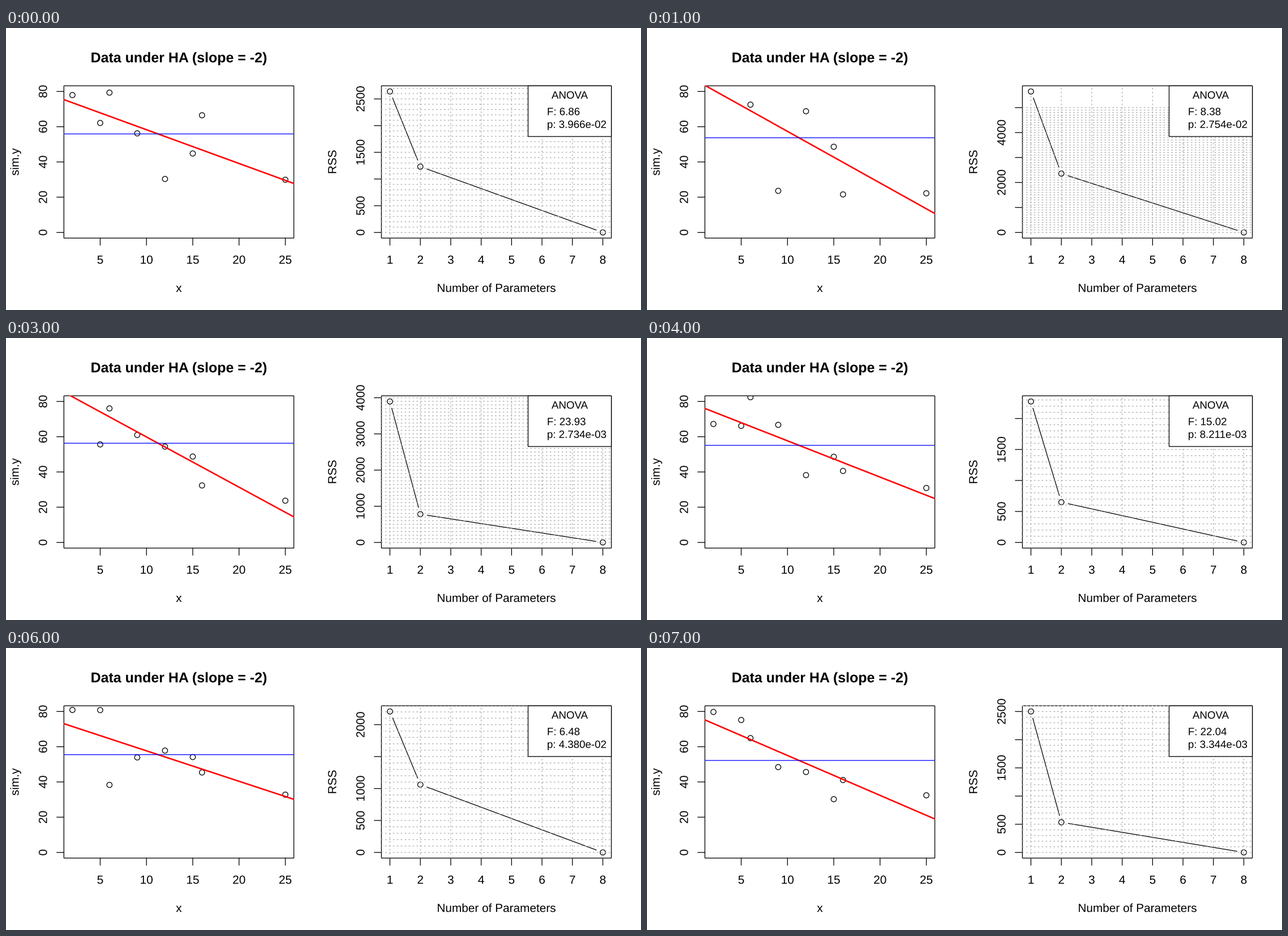
A matplotlib script that plays this animation: 1122 by 499 pixels, repeating every 8 s.

```python
import math

import matplotlib.pyplot as plt
import numpy as np
from matplotlib.animation import FuncAnimation
from matplotlib.patches import Circle, PathPatch, Rectangle
from matplotlib.textpath import TextPath
from matplotlib.transforms import Affine2D

W, H, DPI = 1122, 499, 64
PT = 72 / DPI              # points per pixel
EM = 20.8                  # base text size in pixels
SMALL = 0.9 * EM
LINE = 1.2 * EM            # height of one margin line
LW = 1.3
DASH = EM / 12 / LW        # dash unit in line widths
TOP, BOTTOM = 4.1 * LINE, H - 5.1 * LINE
PAD = 0.04                 # empty share on each side of the data range
KEY_LEFT = 922.5

X = np.array([2, 5, 6, 9, 12, 15, 16, 25])
DX = X - X.mean()
SXX = np.sum(DX ** 2)
DF = len(X) - 2

# mean of y, fitted slope and p value of each simulated data set
RUNS = [
    (55.9, -1.916, 3.966e-2), (53.7, -2.929, 2.754e-2),
    (53.0, -2.411, 4.020e-3), (56.3, -2.850, 2.734e-3),
    (55.1, -2.059, 8.211e-3), (54.7, -2.701, 7.851e-3),
    (55.5, -1.728, 4.380e-2), (52.2, -2.264, 3.344e-3),
]

fig = plt.figure(figsize=(W / DPI, H / DPI), dpi=DPI, facecolor="white")
ax = fig.add_axes([0, 0, 1, 1])
ax.set_xlim(0, W)
ax.set_ylim(H, 0)
ax.axis("off")


def tail(f):
    """Upper tail of the F distribution with 1 and 6 degrees of freedom."""
    c = 1 / (1 + f / DF)
    return 1 - math.sqrt(1 - c) * (1 + c / 2 + 3 * c * c / 8)


def f_value(p):
    lo, hi = 0, 1000
    for _ in range(60):
        mid = (lo + hi) / 2
        lo, hi = (mid, hi) if tail(mid) > p else (lo, mid)
    return lo


def simulate(seed, mean, slope, resid):
    """Random y values whose fit has the given mean, slope and residual sum."""
    noise = np.random.default_rng(seed).normal(size=len(X))
    noise -= noise.mean()
    noise -= DX * np.dot(DX, noise) / SXX
    noise *= math.sqrt(resid / np.sum(noise ** 2))
    return mean + slope * DX + noise


def line(xs, ys, color="black", width=LW, clip=None, **style):
    art, = ax.plot(xs, ys, color=color, lw=width * PT, snap=False, **style)
    if clip:
        art.set_clip_path(clip)
    return art


def text(x, y, s, size=EM, center=True, rotation=0, weight="normal"):
    """Text on its baseline, centred by advance width."""
    prop = {"family": "Liberation Sans", "weight": weight}

    def outline(t):
        return TextPath((0, 0), t, size=size, prop=prop)

    advance = outline(s + "|").get_extents().x1 - outline("|").get_extents().x1
    place = (Affine2D().translate(-advance / 2 if center else 0, 0)
             .scale(1, -1).rotate_deg(-rotation).translate(x, y))
    return ax.add_artist(PathPatch(outline(s), fc="black", lw=0, zorder=6,
                                   transform=place + ax.transData))


def frame_box(x0, y0, x1, y1, **style):
    return ax.add_patch(Rectangle((x0, y0), x1 - x0, y1 - y0, ec="black",
                                  lw=LW * PT, snap=False, **style))


class Panel:
    """A plot region that maps data to stage pixels."""

    def __init__(self, offset, xlim, xlabel, ylabel):
        self.left = offset + 4.1 * LINE
        self.right = offset + W / 2 - 2.1 * LINE
        self.xlim = xlim
        self.box = frame_box(self.left, TOP, self.right, BOTTOM,
                             fc="none", zorder=1)
        self.mid = (self.left + self.right) / 2
        text(self.mid, BOTTOM + 3.82 * LINE, xlabel)
        text(self.left - 3.2 * LINE, (TOP + BOTTOM) / 2, ylabel, rotation=90)

    def px(self, x):
        lo, hi = self.xlim
        t = ((x - lo) / (hi - lo) + PAD) / (1 + 2 * PAD)
        return self.left + t * (self.right - self.left)

    def py(self, y, ymax):
        t = (y / ymax + PAD) / (1 + 2 * PAD)
        return BOTTOM - t * (BOTTOM - TOP)

    def x_axis(self, ticks):
        for v in ticks:
            x = self.px(v)
            line([x, x], [BOTTOM, BOTTOM + LINE / 2])
            text(x, BOTTOM + 1.82 * LINE, str(v))

    def y_axis(self, ticks, ymax):
        """Tick every value, but label only where the text has room."""
        arts, free = [], math.inf
        for v in ticks:
            y = self.py(v, ymax)
            arts.append(line([self.left - LINE / 2, self.left], [y, y]))
            half = 0.278 * EM * len(str(v))
            if y + half < free:
                arts.append(text(self.left - 1.2 * LINE, y, str(v), rotation=90))
                free = y - half - 16
        return arts

    def points(self, xs, ys, ymax):
        arts = []
        for x, y in zip(xs, ys):
            dot = Circle((self.px(x), self.py(y, ymax)), 0.225 * EM, fc="none",
                         ec="black", lw=LW * PT, zorder=2)
            ax.add_patch(dot)
            dot.set_clip_path(self.box)
            arts.append(dot)
        return arts


def gapped(x0, y0, x1, y1, gap=LINE / 2):
    """Segment that stops short of both of its end points."""
    d = math.hypot(x1 - x0, y1 - y0)
    ux, uy = gap * (x1 - x0) / d, gap * (y1 - y0) / d
    return line([x0 + ux, x1 - ux], [y0 + uy, y1 - uy])


def dashed(xs, ys):
    return line(xs, ys, "darkgray", clip=rss.box, zorder=3,
                dashes=(DASH, 3 * DASH), dash_capstyle="round")


data = Panel(0, (2, 25), "x", "sim.y")
data.x_axis(range(5, 26, 5))
data.y_axis(range(0, 81, 20), 80)
text(data.mid, 60.7, "Data under HA (slope = -2)", 1.2 * EM, weight="bold")

rss = Panel(W / 2, (1, 8), "Number of Parameters", "RSS")
rss.x_axis(range(1, 9))
for n in range(1, 9):
    dashed([rss.px(n)] * 2, [BOTTOM, TOP])

frame_box(KEY_LEFT, TOP, rss.right, 192, fc="white", zorder=5)
text((KEY_LEFT + rss.right) / 2, 125, "ANOVA", SMALL)

live = []


def draw_fit(ys, mean, slope):
    live.extend(data.points(X, ys, 80))
    ends = np.array([0, 27])
    span = data.px(ends)
    fit = data.py(mean + slope * (ends - X.mean()), 80)
    live.append(line(span, fit, "red", 2 * LW, clip=data.box, zorder=3))
    live.append(line(span, [data.py(mean, 80)] * 2, "blue",
                     clip=data.box, zorder=4))


def draw_rss(total, resid):
    sizes, sums = [1, 2, 8], [total, resid, 0]
    live.extend(rss.points(sizes, sums, total))
    spots = [(rss.px(n), rss.py(s, total)) for n, s in zip(sizes, sums)]
    for a, b in zip(spots, spots[1:]):
        live.append(gapped(*a, *b))
    step = 500 if total < 3200 else 1000
    top = int(total * (1 + PAD))
    live.extend(rss.y_axis(range(0, top + 1, step), total))
    for v in range(0, min(5000, top + 20) + 1, 100):
        live.append(dashed([rss.left, rss.right], [rss.py(v, total)] * 2))


def draw(i):
    while live:
        live.pop().remove()
    mean, slope, p = RUNS[i]
    f = f_value(p)
    explained = slope ** 2 * SXX
    resid = DF * explained / f
    draw_fit(simulate(i, mean, slope, resid), mean, slope)
    draw_rss(explained + resid, resid)
    live.append(text(955.9, 154.2, f"F: {f:.2f}", SMALL, center=False))
    live.append(text(955.9, 176.8, f"p: {p:.3e}", SMALL, center=False))
    return live


anim = FuncAnimation(fig, draw, frames=len(RUNS), interval=1000,
                     init_func=lambda: draw(0), repeat=True, blit=False)
plt.show()
```
